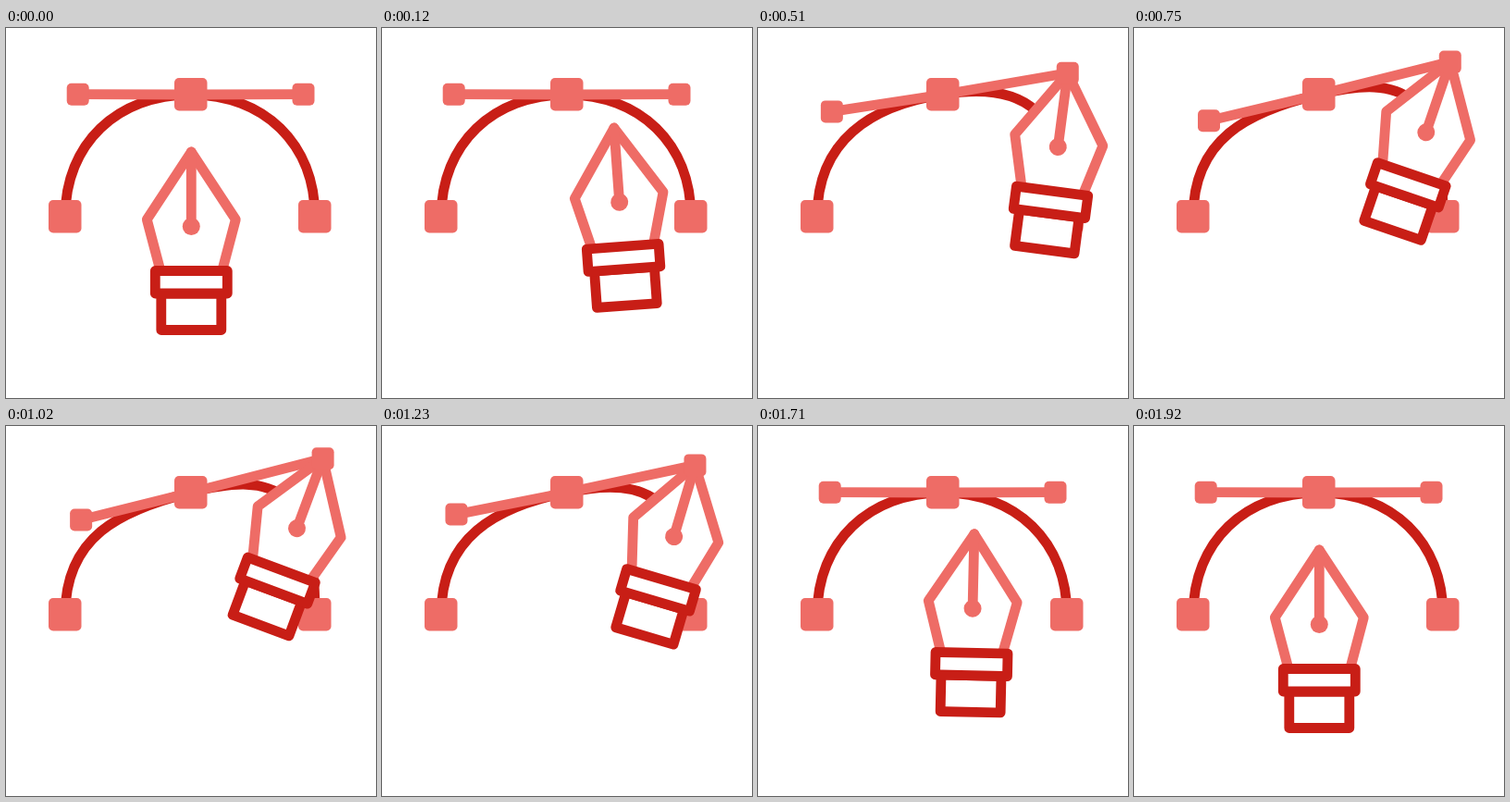
Write an HTML page that moves like this. It is 400x400 px and loops after 1980 ms.

```html
<!DOCTYPE html>
<html lang="en">
<head>
<meta charset="utf-8">
<title>Pen tool</title>
<style>
  html, body { margin: 0; width: 100%; height: 100%; overflow: hidden; background: #fff; }
  svg { display: block; width: 100%; height: 100%; }
  .line { stroke-width: 10.8; stroke-linejoin: round; stroke-linecap: round; fill: none; }
  .pink { stroke: #ee6c66; }
  .red { stroke: #c81e16; }
  .solid { fill: #ee6c66; }
  .paper { fill: #fff; }
</style>
</head>
<body>
<svg viewBox="0 0 400 400">
  <path id="curve" class="line red"/>
  <path id="bar" class="line pink"/>
  <rect class="solid" x="46" y="186" width="35.5" height="35.5" rx="5"/>
  <rect class="solid" x="316" y="186" width="35.5" height="35.5" rx="5"/>
  <rect class="solid" x="182" y="54" width="35.5" height="35.5" rx="5"/>
  <rect id="left" class="solid" x="-12" y="-12" width="24" height="24" rx="5"/>
  <g id="pen">
    <path class="line pink paper" d="M-34 126L-48 73L0 0L48 73L34 126"/>
    <path class="line pink" d="M0 0V80"/>
    <circle class="solid" cy="80.5" r="9.5"/>
    <path class="line red paper" d="M-32.5 153H32.5V192.5H-32.5Z"/>
    <path class="line red paper" d="M-39 128.5H39V153H-39Z"/>
  </g>
  <rect id="right" class="solid" x="-12" y="-12" width="24" height="24" rx="5"/>
</svg>
<script>
const LOOP = 1980, STEP = 30;
const GRAB = 270, PEAK = 900, DROP = 1530, HOME = 1920;
const mid = [199.7, 72], rest = [200.3, 134], grip = [321.5, 71.7];
const $ = id => document.getElementById(id);
const span = (t, a, b) => Math.min(1, Math.max(0, (t - a) / (b - a)));
const mix = (a, b, k) => a + (b - a) * k;
const mixPoint = (a, b, k) => a.map((v, i) => mix(v, b[i], k));
const smooth = u => u * u * (3 - 2 * u);
// Swings a little past the end before settling
const settle = u => 1.2 * u * (1 - u) ** 2 + 4.05 * u * u * (1 - u) + u ** 3;
const place = (id, [x, y], angle = 0) =>
  $(id).setAttribute('transform', `translate(${x} ${y}) rotate(${angle})`);

function draw(t) {
  const rise = span(t, GRAB, PEAK), fall = span(t, PEAK, DROP);
  const pull = t < PEAK ? 1 - (1 - rise) ** 2 : 1 - fall ** 2.4;
  const left = mixPoint([77.7, 71.7], [81.2, 102], pull);
  const right = mixPoint(grip, [343, 34.5], pull);

  let tip = right, angle;
  if (t < GRAB) {
    const k = smooth(span(t, 0, GRAB));
    tip = mixPoint(rest, grip, k);
    angle = -10 * k;
  } else if (t < PEAK) {
    angle = mix(-10, 21, Math.sin(rise * Math.PI / 2));
  } else if (t < DROP) {
    angle = mix(21, 4.5, fall ** 2);
  } else {
    const k = settle(span(t, DROP, HOME));
    tip = mixPoint(grip, rest, k);
    angle = 4.5 * (1 - k);
  }

  const a = mixPoint(mid, left, 0.65), b = mixPoint(mid, right, 0.65);
  $('curve').setAttribute('d',
    `M64 204C64 ${125 - 5 * pull} ${a} ${mid}C${b} 334 ${125 - 59 * pull} 334 204`);
  $('bar').setAttribute('d', `M${left}L${mid}L${right}`);
  place('left', left);
  place('right', right);
  place('pen', tip, angle);
}

const start = performance.now();
function frame() {
  const t = (performance.now() - start) % LOOP;
  draw(Math.floor(t / STEP) * STEP);
  requestAnimationFrame(frame);
}
frame();
</script>
</body>
</html>
```
